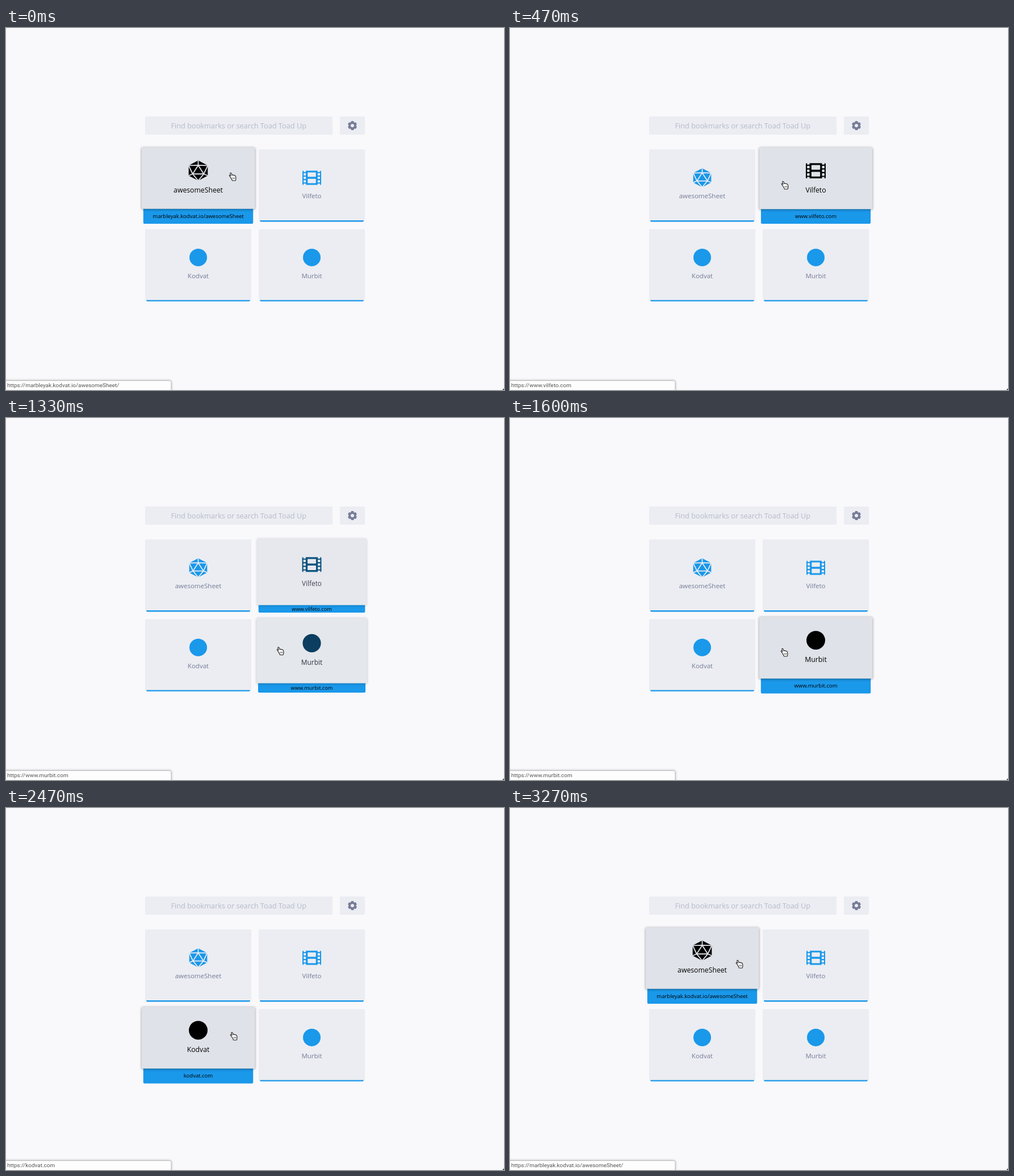
An HTML page with a canvas for the animation above (3340 ms loop, 877 px wide and 638 px high).

```html
<!DOCTYPE html>
<html lang="en">
<head>
<meta charset="utf-8">
<title>Bookmarks</title>
<style>
  html, body { margin: 0; width: 100%; height: 100%; overflow: hidden; background: #f9f8fb; }
  canvas { display: block; }
</style>
</head>
<body>
<canvas id="stage" width="877" height="638"></canvas>
<script>
const ctx = document.getElementById('stage').getContext('2d');
const LOOP = 3340, STEP = 200 / 3, FADE = 300;
const BLUE = [26, 152, 234], GREY = [118, 123, 151], BLACK = [0, 0, 0];
const CARD = [235, 237, 242], CARD_HOVER = [223, 226, 232];
const SANS = '"Open Sans", sans-serif';

// start: hover at loop start; on/off: times the pointer enters and leaves
const tiles = [
  { x: 0, y: 0, name: 'awesomeSheet', url: 'marbleyak.kodvat.io/awesomeSheet', icon: dice, start: 1, on: 2916, off: 190 },
  { x: 200, y: 0, name: 'Vilfeto', url: 'www.vilfeto.com', icon: film, start: 0, on: 230, off: 1238 },
  { x: 0, y: 140.4, name: 'Kodvat', url: 'kodvat.com', icon: disc, start: 0, on: 2037, off: 2908 },
  { x: 200, y: 140.4, name: 'Murbit', url: 'www.murbit.com', icon: disc, start: 0, on: 1231, off: 1982 }
];

const links = [
  [2916, 'marbleyak.kodvat.io/awesomeSheet/'],
  [2037, 'kodvat.com'],
  [1231, 'www.murbit.com'],
  [230, 'www.vilfeto.com'],
  [0, 'marbleyak.kodvat.io/awesomeSheet/']
];

// time, x, y
const pointer = [
  [0, 399, 262], [70, 402, 263], [190, 433, 268], [230, 445, 270], [400, 482, 276],
  [470, 484, 277], [1070, 485, 284], [1140, 485, 294], [1240, 484, 346], [1320, 483, 410],
  [1400, 483, 413], [1800, 483, 413], [1980, 445, 409], [2035, 432, 408], [2133, 403, 405],
  [2200, 400, 404], [2730, 402, 400], [2860, 402, 372], [2933, 400, 310], [3000, 402, 286],
  [3130, 404, 277], [3270, 404, 275]
];

const HAND = new Path2D('M-3.2 1.6L-5 -.8Q-6.4 -2.2 -5.2 -2.7Q-4.2 -2.9 -2.9 -1.4L-4.1 -5' +
  'Q-4.4 -6.6 -3.2 -6.7Q-2.2 -6.7 -1.8 -5.4L-.9 -2.7Q.6 -3.6 1.4 -2.4Q2.8 -3.2 3.4 -1.9' +
  'Q5 -2.3 5.4 -.6L6 2.4Q6 4.5 5 7L-.4 7Q-1.2 5 -3.2 1.6Z');

const mix = (a, b, p) => a + (b - a) * p;
const rgb = c => `rgb(${c.map(Math.round)})`;
const mixRgb = (a, b, p) => rgb(a.map((v, i) => mix(v, b[i], p)));

// cubic-bezier(.25, .1, .25, 1)
function ease(p) {
  if (p <= 0) return 0;
  if (p >= 1) return 1;
  const curve = (s, a, b) => 3 * (1 - s) * (1 - s) * s * a + 3 * (1 - s) * s * s * b + s * s * s;
  let lo = 0, hi = 1;
  for (let i = 0; i < 20; i++) {
    const mid = (lo + hi) / 2;
    if (curve(mid, .25, .25) < p) lo = mid; else hi = mid;
  }
  return curve(lo, .1, 1);
}

function box(l, t, r, b, radius, color) {
  ctx.fillStyle = color;
  ctx.beginPath();
  ctx.roundRect(l, t, r - l, b - t, radius);
  ctx.fill();
}

function text(str, x, y, size, color, font = SANS, align = 'center') {
  ctx.font = `${size}px ${font}`;
  ctx.textAlign = align;
  ctx.fillStyle = color;
  ctx.fillText(str, x, y);
}

function poly(points, close) {
  ctx.beginPath();
  points.forEach(p => ctx.lineTo(...p));
  if (close) ctx.closePath();
}

function disc(color) {
  ctx.fillStyle = color;
  ctx.beginPath();
  ctx.arc(0, 0, 15.5, 0, 7);
  ctx.fill();
}

function dice(color, back) {
  const top = [0, -16.7], ur = [15.8, -8.4], lr = [15.8, 8.4], bottom = [0, 16.7],
        ll = [-15.8, 8.4], ul = [-15.8, -8.4];
  const a = [0, -8.8], b = [-9.2, 5.6], c = [9.2, 5.6];
  ctx.lineJoin = 'round';
  ctx.fillStyle = color;
  poly([top, ur, lr, bottom, ll, ul], true);
  ctx.fill();
  ctx.strokeStyle = back;
  ctx.lineWidth = 1.7;
  [[a, b, c, a, top], [ul, a, ur, c, lr], [ul, b, ll], [b, bottom, c]].forEach(line => {
    poly(line);
    ctx.stroke();
  });
}

function film(color) {
  const s = 33 / 512;
  ctx.fillStyle = color;
  ctx.beginPath();
  ctx.roundRect(-16.5, -12.6, 33, 25.2, 1.5);
  const hole = (x, y, w, h) => ctx.roundRect(x * s, y * s, w * s, h * s, .7);
  hole(-112, -148, 224, 120);
  hole(-112, 28, 224, 120);
  for (const x of [-224, 160]) {
    for (const y of [-128, -32, 64]) hole(x, y, 64, 64);
    ctx.rect(x * s, -12.6, 64 * s, 2.4);
    ctx.rect(x * s, 10.2, 64 * s, 2.4);
  }
  ctx.fill('evenodd');
}

function gear(x, y) {
  ctx.save();
  ctx.translate(x, y);
  ctx.fillStyle = rgb(GREY);
  for (let i = 0; i < 6; i++) {
    poly([[-3.2, -5], [-1.9, -8], [1.9, -8], [3.2, -5]], true);
    ctx.fill();
    ctx.rotate(Math.PI / 3);
  }
  ctx.beginPath();
  ctx.arc(0, 0, 6.1, 0, 7);
  ctx.moveTo(2.8, 0);
  ctx.arc(0, 0, 2.8, 0, 7);
  ctx.fill('evenodd');
  ctx.restore();
  // opening stays clear of the teeth
  ctx.fillStyle = rgb(CARD);
  ctx.beginPath();
  ctx.arc(x, y, 2.8, 0, 7);
  ctx.fill();
}

function drawTile(tile, t) {
  const h = tile.start + ease((t - tile.on) / FADE) - ease((t - tile.off) / FADE);
  const back = mixRgb(CARD, CARD_HOVER, h);
  const edge = mix(339, 318.8, h), zoom = mix(1, 1.064, h);
  ctx.save();
  ctx.translate(tile.x, tile.y);

  ctx.save();
  ctx.beginPath();
  ctx.roundRect(mix(247, 241.8, h), edge - 4, mix(183, 193.4, h), mix(341.4, 345, h) - edge + 4, 2);
  ctx.fillStyle = rgb(BLUE);
  ctx.fill();
  ctx.clip();
  if (h > .004) text(tile.url, 338.5, mix(344.8, 335, h), mix(8.85, 9.5, h), '#000');
  ctx.restore();

  ctx.save();
  ctx.shadowColor = `rgba(0,0,0,${.42 * h})`;
  ctx.shadowBlur = 4;
  ctx.shadowOffsetY = 1;
  box(mix(245, 239, h), mix(214, 210.2, h), mix(432, 438.3, h), edge, 2, back);
  ctx.restore();

  ctx.save();
  ctx.translate(338.5, mix(264, 251.3, h));
  ctx.scale(zoom, zoom);
  tile.icon(mixRgb(BLUE, BLACK, h), back);
  ctx.restore();
  text(tile.name, 338.5, mix(300.4, 290, h), 11.5 * zoom, mixRgb(GREY, BLACK, h));
  ctx.restore();
}

function drawStatus(t) {
  ctx.save();
  ctx.shadowColor = 'rgba(0,0,0,.35)';
  ctx.shadowBlur = 4;
  box(-6, 621.5, 291, 646, 3, '#fdfdfd');
  ctx.restore();
  ctx.strokeStyle = '#bdbdc0';
  ctx.lineWidth = 1;
  ctx.beginPath();
  ctx.roundRect(-6, 621.5, 297, 25, 3);
  ctx.stroke();
  const link = links.find(l => t >= l[0])[1];
  text('https://' + link, 2, 633.3, 9.95, '#555', 'Roboto, sans-serif', 'left');
}

function drawPointer(t) {
  let i = 0;
  while (i < pointer.length - 2 && pointer[i + 1][0] <= t) i++;
  const [t0, x0, y0] = pointer[i], [t1, x1, y1] = pointer[i + 1];
  const p = Math.min(1, (t - t0) / (t1 - t0));
  ctx.save();
  ctx.translate(mix(x0, x1, p), mix(y0, y1, p));
  ctx.lineJoin = 'round';
  ctx.fillStyle = '#fff';
  ctx.strokeStyle = '#222';
  ctx.lineWidth = 1.1;
  ctx.fill(HAND);
  ctx.stroke(HAND);
  ctx.lineWidth = .7;
  for (const x of [0, 1.8, 3.6]) {
    poly([[x, 1.4], [x + .5, 4.2]]);
    ctx.stroke();
  }
  ctx.restore();
}

function draw(t) {
  ctx.fillStyle = '#f9f8fb';
  ctx.fillRect(0, 0, 877, 638);
  box(245, 156, 575, 188, 2, rgb(CARD));
  text('Find bookmarks or search Toad Toad Up', 409.7, 176.8, 12.74, '#b6bacb');
  box(588, 156, 632, 188, 2, rgb(CARD));
  gear(610, 172);
  tiles.forEach(tile => drawTile(tile, t));
  drawStatus(t);
  drawPointer(t);
  ctx.fillStyle = '#444';
  poly([[877, 635], [877, 638], [874, 638]], true);
  ctx.fill();
}

function frame() {
  const t = performance.now() % LOOP;
  draw(Math.min(49, Math.floor((t + 5) / STEP)) * STEP);
  requestAnimationFrame(frame);
}
frame();
</script>
</body>
</html>
```
